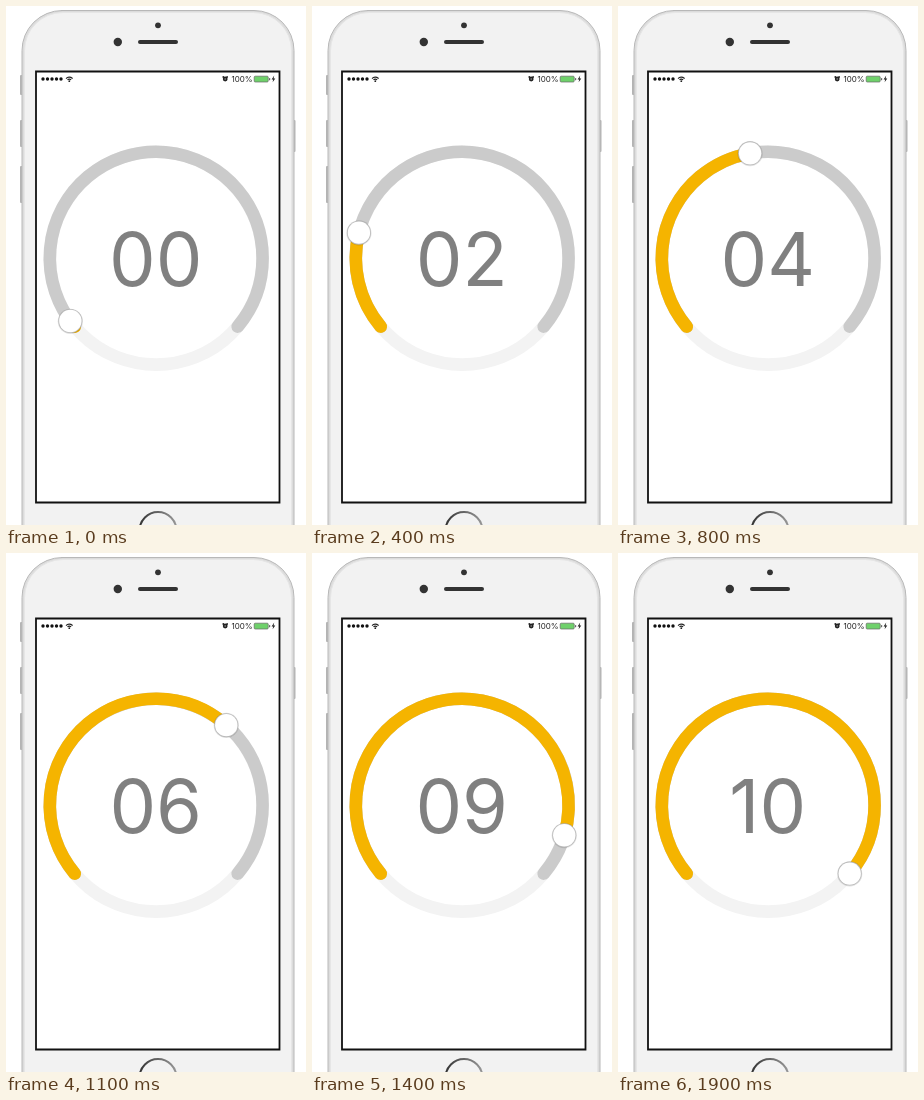
An HTML page with a canvas that plays this animation: 300x519 px, repeating every 2000 ms.

```html
<!DOCTYPE html>
<html lang="en">
<head>
<meta charset="utf-8">
<title>Circular slider</title>
<style>
html, body { margin: 0; width: 100%; height: 100%; overflow: hidden; background: #fff; }
canvas { display: block; width: 300px; height: 519px; }
</style>
</head>
<body>
<canvas id="stage"></canvas>
<script>
const W = 300, H = 519, LOOP = 2000, STEP = 100;
const CX = 150.2, CY = 252.2, R = 106.4, TRACK = 12.6, START = 140, SWEEP = 260;
// knob angle in degrees, one per step; it rests at the end
const ANGLES = [143.8, 155.5, 168.1, 181, 193.9, 212, 229.5, 245, 260.2, 277,
  294, 311.2, 331, 353, 376.4, 394, 400];

const canvas = document.getElementById('stage');
const ctx = canvas.getContext('2d');
const dpr = window.devicePixelRatio || 1;
canvas.width = W * dpr;
canvas.height = H * dpr;
ctx.scale(dpr, dpr);

const homeRing = ctx.createLinearGradient(133, 0, 171, 0);
homeRing.addColorStop(0, '#333');
homeRing.addColorStop(1, '#999');

const rad = deg => deg * Math.PI / 180;

function disc(x, y, r, color) {
  ctx.beginPath();
  ctx.arc(x, y, r, 0, Math.PI * 2);
  ctx.fillStyle = color;
  ctx.fill();
}

function arc(x, y, r, from, to, color, width, cap = 'round') {
  ctx.beginPath();
  ctx.arc(x, y, r, rad(from), rad(to));
  ctx.strokeStyle = color;
  ctx.lineWidth = width;
  ctx.lineCap = cap;
  ctx.stroke();
}

function box(x, y, w, h, r, fill, stroke, width = 1) {
  ctx.beginPath();
  ctx.roundRect(x, y, w, h, r);
  if (fill) { ctx.fillStyle = fill; ctx.fill(); }
  if (stroke) { ctx.strokeStyle = stroke; ctx.lineWidth = width; ctx.stroke(); }
}

function text(str, x, y, font, color, align) {
  ctx.font = font;
  ctx.fillStyle = color;
  ctx.textAlign = align;
  ctx.textBaseline = 'alphabetic';
  ctx.fillText(str, x, y);
}

function phone() {
  for (const [y, h] of [[69, 20], [114, 27], [160, 37]]) box(14, y, 3, h, 1, '#b4b4b4');
  box(287, 114, 2.5, 32, 1, '#b4b4b4');
  box(16, 4.5, 272, 590, 40, '#dcdcdc', '#b8b8b8');
  box(18.5, 6.5, 267, 586, 38, '#f2f2f2', '#e6e6e6');

  disc(152, 19.3, 2.9, '#333');
  disc(111.8, 36, 4.2, '#333');
  box(132, 34, 40, 4, 2, '#333');
  box(30, 65.5, 243.5, 431, 0, '#fff', '#111', 1.8);
  arc(152, 524.6, 18.5, 0, 360, homeRing, 2);
}

function statusBar() {
  for (let i = 0; i < 5; i++) disc(37 + i * 4.5, 73, 1.7, '#111');

  for (const r of [2.4, 4.4]) arc(63.3, 75.5, r, 222, 318, '#222', 1.1, 'butt');
  disc(63.3, 75.2, 0.9, '#222');

  disc(219.2, 73, 2.4, '#222');
  disc(217.3, 71, 0.9, '#222');
  disc(221.1, 71, 0.9, '#222');
  disc(219.2, 73, 0.8, '#999');

  text('100%', 246.7, 76, '8px Inter, Roboto, sans-serif', '#222', 'right');
  box(248.2, 70.2, 14, 5.8, 1, '#6fd16b', '#666', 0.7);
  box(263, 72, 1.2, 2.2, 0.5, '#666');
  ctx.beginPath();
  ctx.moveTo(268.2, 69.5);
  ctx.lineTo(265.6, 73.4);
  ctx.lineTo(267.2, 73.4);
  ctx.lineTo(266.6, 76.3);
  ctx.lineTo(269.3, 72.4);
  ctx.lineTo(267.6, 72.4);
  ctx.fillStyle = '#222';
  ctx.fill();
}

function slider(angle) {
  arc(CX, CY, R, 0, 360, '#f3f3f3', TRACK);
  arc(CX, CY, R, START, START + SWEEP, '#cbcbcb', TRACK);
  arc(CX, CY, R, START, angle, '#f5b400', TRACK);

  const x = CX + R * Math.cos(rad(angle));
  const y = CY + R * Math.sin(rad(angle));
  disc(x, y + 0.3, 12.6, 'rgba(0,0,0,0.12)');
  disc(x, y, 12, '#b9b9b9');
  disc(x, y, 11.2, '#fff');

  const value = Math.floor((angle - START) / SWEEP * 10 + 1e-6);
  text(String(value).padStart(2, '0'), 149.7, 279.5,
    '400 74px Inter, Roboto, sans-serif', '#808080', 'center');
}

function draw(now) {
  const step = Math.floor((now % LOOP) / STEP);
  ctx.clearRect(0, 0, W, H);
  phone();
  statusBar();
  slider(ANGLES[Math.min(step, ANGLES.length - 1)]);
}

let begin;
function tick() {
  const now = performance.now();
  begin ??= now;
  draw(now - begin);
  requestAnimationFrame(tick);
}
tick();
</script>
</body>
</html>
```
